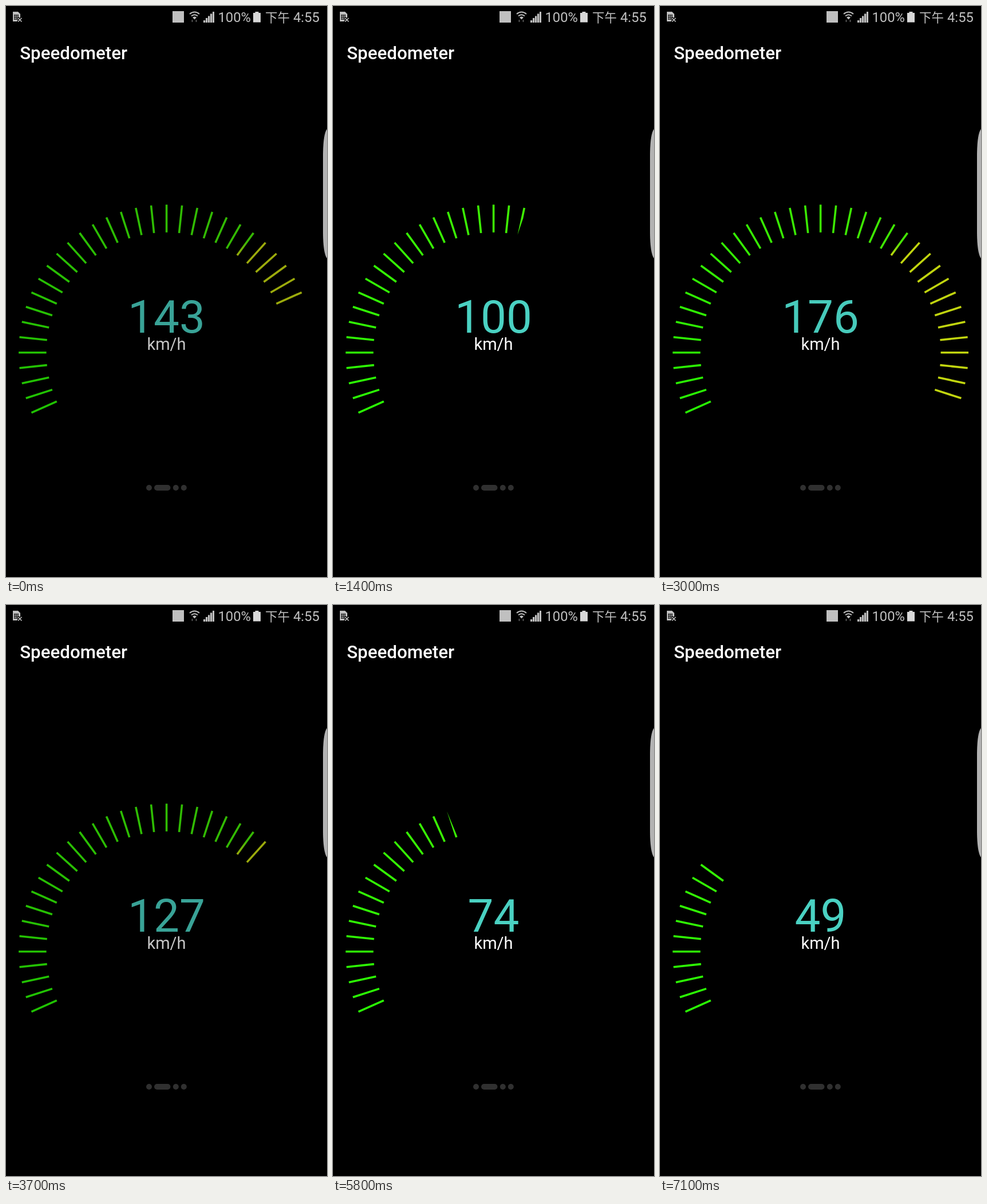
Recreate the animation shown at these times as an HTML page. Size 561 px wide and 998 px high, loop 7.2 s.

```html
<!DOCTYPE html>
<html lang="en">
<head>
<meta charset="utf-8">
<title>Speedometer</title>
<style>
  html, body { margin: 0; height: 100%; overflow: hidden; background: #000; }
  svg { display: block; width: 561px; height: 998px; font-family: Roboto, "Noto Sans CJK TC", "Noto Sans CJK JP", "Noto Sans CJK SC", sans-serif; }
</style>
</head>
<body>
<svg viewBox="0 0 561 998">
  <defs>
    <linearGradient id="turn" gradientUnits="userSpaceOnUse" x1="210" x2="240" y1="0" y2="0">
      <stop offset="0" stop-color="#c8dc10"/>
      <stop offset="1" stop-color="#46ec06"/>
    </linearGradient>
  </defs>

  <!-- status bar -->
  <g fill="#c0c0c0">
    <path d="M12 10h9l4 4v6l-3 2v5H12z"/>
    <path d="M14 16h8M14 19.5h8M14 23h8M15 15v9M18 15v9M21 15v9" stroke="#000"/>
    <path d="M20.5 20.5l7.5 7M28 20.5l-7.5 7" stroke="#000" stroke-width="4"/>
    <path d="M21 21l6.5 6.5M27.5 21l-6.5 6.5" stroke="#c0c0c0" stroke-width="1.6"/>
    <rect x="291" y="9" width="20" height="20"/>
    <path d="M321 14q8.5-7 17 0M324 17.5q5.5-4.5 11 0" fill="none" stroke="#c0c0c0" stroke-width="2"/>
    <path d="M326 20q3.5-3 7 0l-3.5 3.5z"/>
    <path d="M325.5 24v4M332.5 24v4" stroke="#555" stroke-width="2"/>
    <path d="M345 25h3.3v4h-3.3zM349 21h3.3v8h-3.3zM353 17.500h3.3V29h-3.3zM357 13.500h3.3V29h-3.3zM361 10h3v19h-3z"/>
    <path d="M432 12h3.5v-2h6v2h3.5v16.5h-13z" fill="#d8d8d8"/>
    <g font-size="23.8">
      <text x="370.5" y="28">100%</text>
      <text x="453" y="28" font-size="21.5">下午</text>
      <text x="502" y="28">4:55</text>
    </g>
  </g>

  <text x="24.2" y="93" font-size="31.3" font-weight="500" fill="#fff">Speedometer</text>
  <path d="M561 215C556 221 554 240 554 262V394C554 416 556 435 561 441z" fill="#b3b3b3"/>

  <g id="gauge" text-anchor="middle">
    <g id="ticks" transform="translate(280.6 605.7)"></g>
    <text id="speed" x="280.5" y="571" font-size="80" fill="#4ad1c2"></text>
    <text x="280.5" y="601" font-size="29" fill="#fff">km/h</text>
  </g>

  <g fill="#303030">
    <circle cx="250" cy="842" r="5"/>
    <rect x="259" y="837" width="28.5" height="10" rx="5"/>
    <circle cx="296.8" cy="842" r="5"/>
    <circle cx="310.8" cy="842" r="5"/>
  </g>
</svg>
<script>
const LOOP = 7200, STEP = 100, LEAD = 25;
const TICKS = 39, MAX_SPEED = 180, WARN_SPEED = 110, PULSE = 1850;
const INNER = 210, OUTER = 258.5, HALF = 1.8;

// Turning points of the speed: [ms, km/h], joined by straight ramps
const turns = [[0, 143], [600, 175], [1500, 91], [2500, 175], [3200, 177],
  [4850, 11], [5550, 98], [5800, 74], [LOOP, 47]];

function speedAt(t) {
  const i = turns.findIndex(([end]) => end > t);
  const [t0, a] = turns[i - 1], [t1, b] = turns[i];
  return a + (b - a) * (t - t0) / (t1 - t0);
}

function opacityAt(t, speed) {
  return speed > WARN_SPEED ? .89 - .11 * Math.cos(2 * Math.PI * t / PULSE) : 1;
}

function tickColor(i) {
  if (i === 25) return "url(#turn)";
  return i > 25 ? "#c8dc10" : `rgb(${42 + i},${250 - i / 2},4)`;
}

// One end is cut off diagonally; amount 1 gives the whole bar
function tickShape(i, amount) {
  const [full, cut] = i >= TICKS / 2 ? [OUTER, INNER] : [INNER, OUTER];
  const corner = full + (cut - full) * amount;
  return `${cut},${-HALF} ${full},${-HALF} ${full},${HALF} ${corner},${HALF}`;
}

const gauge = document.getElementById("gauge");
const speedText = document.getElementById("speed");
const ticks = Array.from({ length: TICKS }, (_, i) => {
  const tick = document.createElementNS("http://www.w3.org/2000/svg", "polygon");
  tick.setAttribute("transform", `rotate(${156 + 6 * i})`);
  tick.setAttribute("fill", tickColor(i));
  return document.getElementById("ticks").appendChild(tick);
});

function draw(now) {
  const t = Math.floor(now % LOOP / STEP) * STEP;
  const speed = speedAt(t);
  const level = speedAt(t + LEAD) * (TICKS - 1) / MAX_SPEED;
  ticks.forEach((tick, i) => {
    const amount = Math.min(1, 1 - 2 * (i - level));
    tick.setAttribute("points", amount > 0 ? tickShape(i, amount) : "");
  });
  speedText.textContent = Math.round(speed);
  gauge.setAttribute("opacity", opacityAt(t, speed));
}

const start = performance.now();
function loop() {
  draw(performance.now() - start);
  requestAnimationFrame(loop);
}
loop();
</script>
</body>
</html>
```
